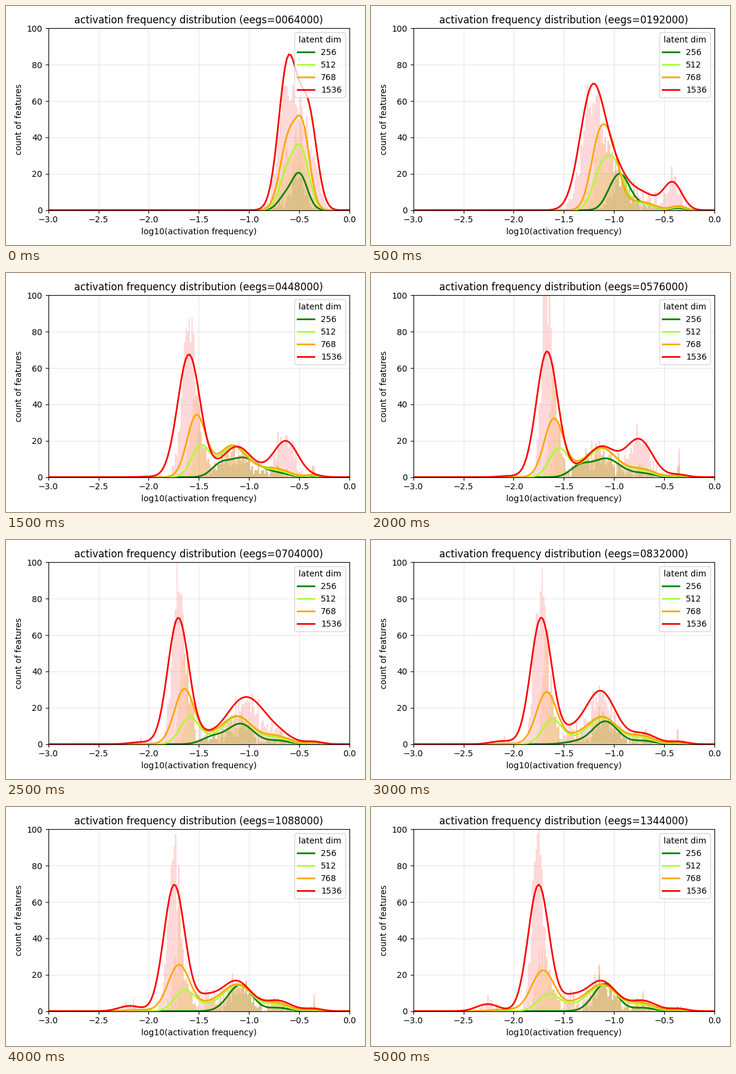
Recreate the animation shown at these times as a matplotlib script. Size 600x400 px, loop 5250 ms.

```python
import numpy as np
import matplotlib.pyplot as plt
from matplotlib.animation import FuncAnimation

STEPS = 21
EEGS_PER_STEP = 64000
EDGES = np.linspace(-3, 0, 201)
CENTERS = (EDGES[:-1] + EDGES[1:]) / 2
GRID = np.linspace(-3, 0, 150)
BAR_SCALE = 0.75     # histogram bin width / density bin width
MIN_SPREAD = 0.012


def ease(t, start, end, tau):
    """Stretched exponential approach from start to end."""
    return end + (start - end) * np.exp(-(t / tau)**0.88)


def smooth(t, t0, t1):
    x = np.clip((t - t0) / (t1 - t0), 0, 1)
    return x * x * (3 - 2 * x)


def wave(t, peak):
    """Passing swell: 0 at the start, 1 at peak, then back to 0."""
    x = t / peak
    return (x * np.exp(1 - x))**4


# Each layer is a sum of bumps: (height, center, width).

def tiny(t):
    on = smooth(t, 0, 2)
    return [
        (6.3 * (1 - smooth(t, 7, 14)), ease(t, -.65, -1.41, 3), .07 + .0035 * t),
        (ease(t, 20, 15.3, 1) - 5.5 * wave(t, 7), ease(t, -.5, -1.09, 1.5),
         .078 + .037 * smooth(t, 0, 8) + .015 * wave(t, 8)),
        (3.5 * wave(t, 4), -.89, .1),
        (on * ease(t, 5, 1.8, 2.5), -.71, .11),
        (on * ease(t, 1.9, .5, 3), -.36, .06),
    ]


def small(t):
    on = smooth(t, 0, 2)
    return [
        (19.5 - .5 * t, ease(t, -.62, -1.65, 3), .08 + .0015 * t),
        (ease(t, 31, 14.2, 2.6), ease(t, -.48, -1.115, 1.8) - .16 * wave(t, 3.5),
         .078 + .065 * smooth(t, 0, 8)),
        (4.5 * wave(t, 4), -.95, .11),
        (1.8 * smooth(t, 4, 8), -1.38, .11),
        (on * 3.5, -.73, .12),
        (on * ease(t, 2.8, .6, 3), -.36, .065),
    ]


def medium(t):
    on = smooth(t, 0, 2)
    return [
        (38 - .78 * t, ease(t, -.61, -1.715, 3.15), .083 + .0016 * t),
        (ease(t, 41, 14.6, 2.2), ease(t, -.465, -1.12, 1.6) - .16 * wave(t, 3.5),
         .072 + .076 * smooth(t, 0, 9)),
        (4.5 * wave(t, 4), -.95, .11),
        (3 * smooth(t, 4, 8), -1.4, .11),
        (on * 4.4, -.73, .13),
        (on * ease(t, 3.5, .9, 3), -.36, .07),
        (.9 * smooth(t, 6, 20), -2.1, .12),
    ]


def large(t):
    on = smooth(t, 0, 2)
    return [
        (ease(t, 82, 69.5, .6) - 8 * wave(t, 3), ease(t, -.61, -1.755, 2.73),
         ease(t, .094, .104, 1) + .026 * wave(t, 3)),
        (ease(t, 52, 16.7, .8), ease(t, -.41, -1.13, 1.1),
         ease(t, .085, .15, 1.5)),
        # A slow group drifts left and joins the others.
        (15 * on * (1 - smooth(t, 11, 15)), -.38 - .0112 * t**1.7,
         .08 + .006 * t),
        (6.8 * smooth(t, 3, 16), -1.44, .11),
        (on * ease(t, 14, 5.6, 1.8), -.71, .13),
        (1.4 * smooth(t, 4, 8), -.36, .09),
        (4.3 * smooth(t, 3, 24), -1.9 - .018 * t, .11),
    ]


LAYERS = [(256, "green", tiny), (512, "greenyellow", small),
          (768, "orange", medium), (1536, "red", large)]


def mixture(x, height, center, width):
    z = (x[:, None] - center) / width
    return (height * np.exp(-z**2 / 2)).sum(axis=1)


def sharpen(size, height, center, width):
    """Undo the kernel smoothing (Scott's rule) to get the raw spread."""
    factor = size ** -0.2
    weight = height * width / (height * width).sum()
    mean = (weight * center).sum()
    var = (weight * (width**2 + (center - mean)**2)).sum()
    band2 = factor**2 * var / (1 + factor**2)
    raw = np.sqrt(np.maximum(width**2 - band2, MIN_SPREAD**2))
    return BAR_SCALE * height * width / raw, center, raw


fig, ax = plt.subplots(figsize=(6, 4), dpi=100)
bars, lines = [], []
for size, color, _ in LAYERS:
    bars.append(ax.stairs(np.zeros(200), EDGES, fill=True, color=color,
                          alpha=0.15, linewidth=0))
    lines += ax.plot(GRID, 0 * GRID, color=color, lw=2, label=str(size))

title = ax.set_title("activation frequency distribution (eegs=0064000)")
ax.set(xlim=(-3, 0), ylim=(0, 100), xlabel="log10(activation frequency)",
       ylabel="count of features")
ax.grid(alpha=0.3)
ax.legend(title="latent dim", loc="upper right")
fig.tight_layout()


def update(step):
    rng = np.random.default_rng(step + 7)
    counts = np.zeros(200)
    expected = np.zeros(200)
    for (size, _, bumps), bar, line in zip(LAYERS, bars, lines):
        shape = np.array(bumps(step)).T
        line.set_ydata(mixture(GRID, *shape))
        # Every larger set contains the smaller ones.
        rate = mixture(CENTERS, *sharpen(size, *shape))
        counts = counts + rng.poisson(np.maximum(rate - expected, 0))
        expected = np.maximum(rate, expected)
        bar.set_data(values=counts)
    eegs = EEGS_PER_STEP * (step + 1)
    title.set_text(f"activation frequency distribution (eegs={eegs:07d})")
    return [*bars, *lines, title]


anim = FuncAnimation(fig, update, frames=STEPS, interval=250,
                     repeat=True, repeat_delay=0)
plt.show()
```
